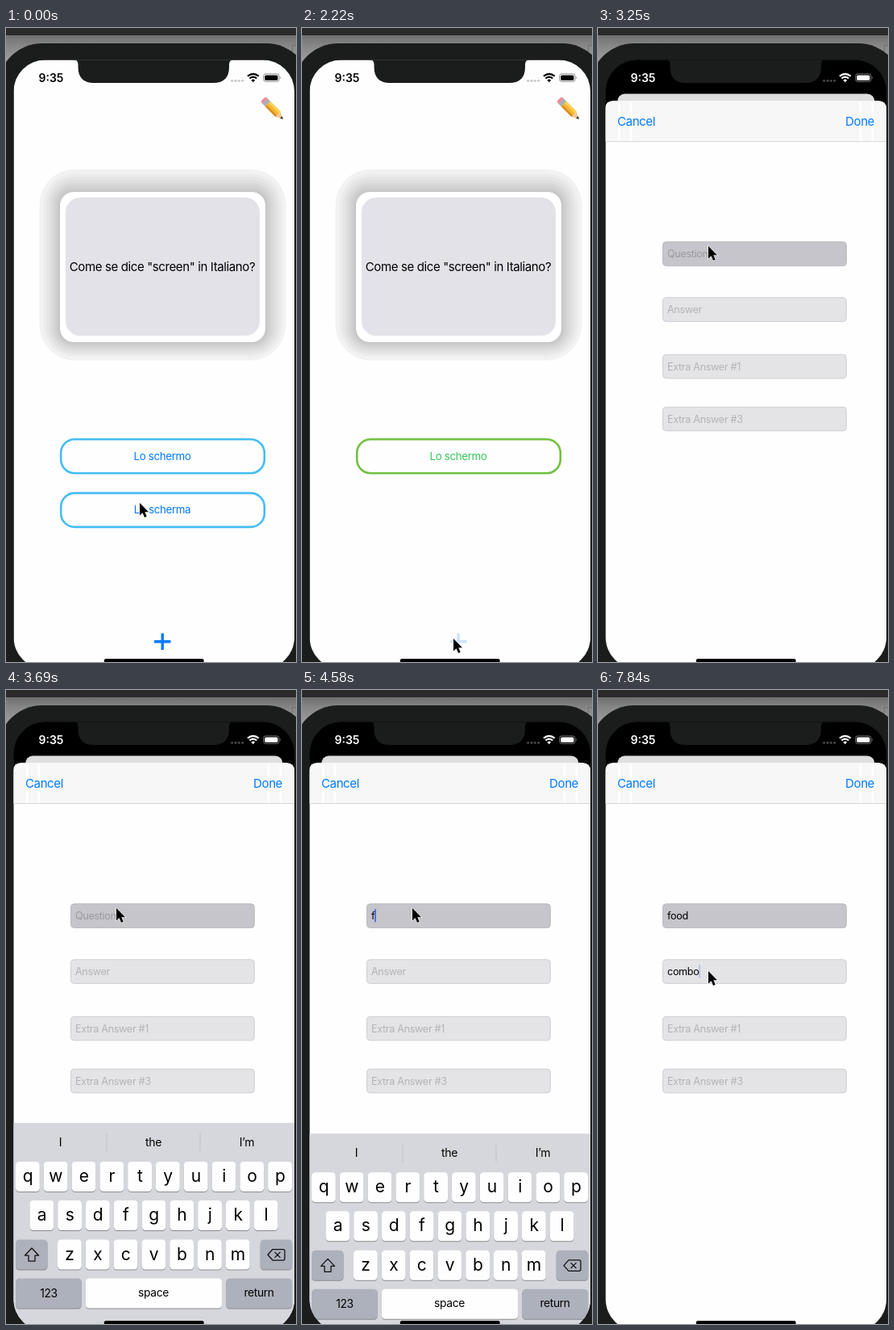
Recreate the animation shown at these times as an HTML page. Size 360x785 px, loop 7.99 s.

```html
<!DOCTYPE html>
<html lang="en">
<head>
<meta charset="utf-8">
<title>Flashcards</title>
<style>
html, body { margin: 0; width: 100%; height: 100%; overflow: hidden; background: #1b1d1d; }
svg { display: block; width: 360px; height: 785px; }
text { font-family: Inter, Roboto, sans-serif; letter-spacing: -.025em; white-space: pre; }
.mid { text-anchor: middle; }
.field { font-size: 12.6px; }
</style>
</head>
<body>
<script>
const LOOP = 7990, STEP = 147.96;
const BLUE = '#007aff';

const rect = (x, y, w, h, r, fill, extra = '') =>
  `<rect x="${x}" y="${y}" width="${w}" height="${h}" rx="${r}" fill="${fill}" ${extra}/>`;
const label = (x, y, size, str, fill = '#000', extra = '') =>
  `<text x="${x}" y="${y}" font-size="${size}" fill="${fill}" ${extra}>${str}</text>`;
const centred = (x, y, size, str, fill) => label(x, y, size, str, fill, 'class="mid"');

// Banded shadow: nested rounded rectangles that darken inwards
function cardShadow() {
  const bands = [25.5, 20.5, 17, 13.5, 10, 7, 4, 1.5];
  return bands.map((d, i) => {
    const c = 242 - i * 6.5;
    return rect(67 - d, 200.5 + 2.5 * i / 7 - d, 255 + 2 * d, 185.5 + 2 * d,
      16 + d * 1.1, `rgb(${c},${c},${c})`);
  }).join('');
}

const pencil = `<g transform="translate(331 100) rotate(45)">
  ${rect(-17, -4.5, 7, 9, 3, '#e8919b')}
  ${rect(-12.5, -4.5, 4, 9, 0, '#9fb0b8')}
  ${rect(-8.5, -4.5, 18, 9, 0, '#f6b530')}
  ${rect(-8.5, -4.5, 18, 3, 0, '#ffd05a')}
  ${rect(-8.5, 2, 18, 2.5, 0, '#d98a1c')}
  <path d="M9.5-4.5L18 0L9.5 4.5Z" fill="#eccb9d"/>
  <path d="M14.7-1.8L18.3 0L14.7 1.8Z" fill="#333"/></g>`;

const answer = (id, y, str) => `<g id="${id}">
  <rect x="68.2" y="${y}" width="252.6" height="42" rx="17" fill="none" stroke="#45bdf3" stroke-width="2.6"/>
  ${centred(194, y + 25.5, 13.3, str, BLUE)}</g>`;

const home = `<g id="home"><g clip-path="url(#homeClip)">
  ${rect(9, 39, 350, 755, 0, '#fefefe')}
  ${cardShadow()}
  ${rect(67, 203, 255, 186, 17, '#fff')}
  ${rect(74, 210, 241, 171, 18, '#e3e2e8')}
  ${centred(194, 301, 15, 'Come se dice "screen" in Italiano?')}
  ${answer('right', 509.2, 'Lo schermo')}
  ${answer('wrong', 575.9, 'Lo scherma')}
  <path id="plus" d="M184 759.7H204.4M194.2 749.5V770" stroke="${BLUE}" stroke-width="3.4"/>
  ${pencil}
  <rect id="dim" x="9" y="39" width="350" height="755"/>
</g></g>`;

const FIELDS = [[174, 'Question'], [243, 'Answer'], [313.5, 'Extra Answer #1'], [378.5, 'Extra Answer #3']];
const field = ([y, hint], i) =>
  rect(80.5, y + .5, 227.8, 29.6, 4, i ? '#e4e4e7' : '#c6c5cb', `stroke="${i ? '#cfcfd4' : '#b9b8be'}"`) +
  label(86, y + 20, 12.6, hint, i ? '#b3b3b8' : '#9b9aa0', `class="field" id="field${i}"`);

const modal = `<g id="modal">
  <path d="M9 720V10Q9 0 19 0H348Q358 0 358 10V720Z" fill="#fefefe"/>
  <path d="M9 50V10Q9 0 19 0H348Q358 0 358 10V50Z" fill="#f7f7f7"/>
  ${[25, 39.5, 324.5, 339.5].map(x => rect(x, 2, 2.8, 48, 1, '#fff')).join('')}
  ${rect(9, 49.8, 350, 1, 0, '#d6d6d6')}
  ${label(24, 31, 15, 'Cancel', BLUE)}
  ${label(343, 31, 15, 'Done', BLUE, 'text-anchor="end"')}
  ${FIELDS.map(field).join('')}
  <rect id="caret" width="1.7" height="16" fill="#3f66e0"/></g>`;

const key = (x, y, w, fill = '#fefefe') =>
  rect(x, y + 1, w, 37, 4.5, '#898b90') + rect(x, y, w, 37, 4.5, fill);
const letterRow = (letters, x0, y) => [...letters].map((c, i) => {
  const x = x0 + i * 34.8;
  return key(x, y, 29.8) + centred(x + 14.9, y + 25, 21, c);
}).join('');

const GREY = '#adb1bb';
const keyboard = `<g id="keyboard">
  ${rect(9, 492, 350, 305, 0, '#d5d7dc')}
  <path d="M125 505V527M241 505V527" stroke="#bfc1c6"/>
  ${centred(67.5, 521, 14, 'I')}${centred(183, 521, 14, 'the')}${centred(299, 521, 14, 'I’m')}
  ${letterRow('qwertyuiop', 12, 540)}
  ${letterRow('asdfghjkl', 29.4, 588)}
  ${letterRow('zxcvbnm', 64, 636.5)}
  ${key(12, 636.5, 39.5, GREY)}${key(315.7, 636.5, 39.5, GREY)}
  ${key(12, 684.5, 81.8, GREY)}${key(98.8, 684.5, 169.4)}${key(273.3, 684.5, 81.8, GREY)}
  ${centred(53, 708, 13.8, '123')}${centred(183, 707, 13.8, 'space')}${centred(314, 707, 13.8, 'return')}
  <g fill="none" stroke="#111" stroke-width="1.3" stroke-linejoin="round">
    <path d="M32 647L40.5 656H36V663H28V656H23.5Z"/>
    <path d="M331 648.5H344Q346 648.5 346 650.5V660Q346 662 344 662H331L325 655.2ZM333.5 651.8L340.5 658.8M340.5 651.8L333.5 658.8"/>
  </g>
  <g fill="none" stroke="#55585d" stroke-width="1.6" stroke-linecap="round">
    <circle cx="46.3" cy="756.7" r="11"/>
    <path d="M39.5 759H53Q52 765 46.3 765T39.5 759Z"/>
    <path d="M42.5 752V754M50 752V754" stroke-width="2.4"/>
    <rect x="316.3" y="743.5" width="7.6" height="15.5" rx="3.8"/>
    <path d="M312.5 754V756Q312.5 763 320 763T327.5 756V754M320 763V768M315.5 768.5H324.5"/>
  </g></g>`;

const statusBar = `
  <g fill="#8e8e93" opacity=".5">${[280.6, 285, 289.3, 293.6].map(x => `<circle cx="${x}" cy="65.3" r="1.5"/>`).join('')}</g>
  <g id="status">
    <text x="40.5" y="66.7" font-size="14" font-weight="600" style="letter-spacing:0">9:35</text>
    <path d="M306.8 67.2L304.4 64.6Q306.8 62.6 309.2 64.6Z"/>
    <g fill="none" stroke="currentColor" stroke-width="2.1">
      <path d="M302.4 62.4Q306.8 58.9 311.2 62.4M299.9 59.6Q306.8 54 313.7 59.6"/>
      <rect x="319.6" y="56.9" width="19.4" height="9.4" rx="2.8" stroke-width="1" opacity=".45"/>
    </g>
    ${rect(321.2, 58.5, 16.2, 6.2, 1.5, 'currentColor')}
    <path d="M340.2 60Q342 61.6 340.2 63.2Z" opacity=".5"/>
  </g>`;

document.body.innerHTML = `<svg viewBox="0 0 360 785">
  <defs>
    <linearGradient id="desk" x2="0" y2="1"><stop stop-color="#5f5f5f"/><stop offset=".35" stop-color="#858585"/><stop offset="1" stop-color="#b5b5b5"/></linearGradient>
    <clipPath id="screen"><rect x="9.5" y="39.5" width="348.5" height="754" rx="39"/></clipPath>
    <clipPath id="homeClip"><rect id="homeShape" x="9.5" y="39.5" width="348.5" height="754"/></clipPath>
  </defs>
  ${rect(0, 0, 360, 60, 0, 'url(#desk)')}
  ${rect(0, 0, 360, 9, 0, '#2a2a2a')}
  <path d="M360 21.5H355.5V38H360" fill="none" stroke="#707070"/>
  ${rect(-10, 19, 388, 840, 55, '#1b1d1d')}
  <g clip-path="url(#screen)">
    ${rect(9, 39, 350, 756, 0, '#000')}
    ${home}
    <path d="M83 39Q89.500 39 89.500 45V48Q89.500 68 109 68H257.500Q277 68 277 48V45Q277 39 284 39Z" fill="#1b1d1d"/>
    ${statusBar}${modal}${keyboard}
    ${rect(121.7, 781, 124, 5, 2.5, '#000')}
  </g>
  <path id="cursor" d="M0 0V15.600L3.600 12.300L6 17.900L8.700 16.700L6.300 11.300H11Z" fill="#000" stroke="#fff" stroke-width="1.1" paint-order="stroke"/>
</svg>`;

const $ = id => document.getElementById(id);
const set = (el, attrs) => { for (const k in attrs) el.setAttribute(k, attrs[k]); };
const mix = (a, b, k) => a + (b - a) * k;

// Critically damped approach from 0 to 1
const spring = (n, start, speed) => {
  const t = Math.max(0, n - start) * speed;
  return 1 - (1 + t) * Math.exp(-t);
};

const PATH = [[0, 166, 588], [4, 186, 527], [6, 186, 527], [8, 174, 574], [12, 188, 756], [15, 188, 756],
  [17, 168, 393], [20, 137, 270], [33, 137, 270], [35, 122, 348], [41, 122, 348], [43, 127, 418],
  [45, 127, 418], [47, 137, 348], [54, 137, 348]];
function cursorAt(n) {
  const i = PATH.findIndex(p => p[0] > n);
  const [a, ax, ay] = PATH[i - 1], [b, bx, by] = PATH[i];
  const u = (n - a) / (b - a), k = u * u * (3 - 2 * u);
  return [mix(ax, bx, k), mix(ay, by, k)];
}

// Latest entry whose step has been reached
const latest = (list, n) => list.filter(e => e[0] <= n).pop()[1];
const TYPED = [
  [[0, ''], [31, 'f'], [32, 'foo'], [33, 'food']],
  [[0, ''], [36, 'c'], [37, 'ci'], [40, 'cib'], [41, 'cibo'], [44, 'combo']]
];
const CARET = [[0, -1], [31, 0], [35, 1], [44, 2], [48, 1]];

function draw(ms) {
  const n = Math.min(53, Math.floor((ms + 16) / STEP));

  const solved = n >= 6;
  const [box, text] = $('right').children;
  set(box, { stroke: solved ? '#72c13f' : '#45bdf3' });
  set(text, { fill: solved ? '#34c759' : BLUE, opacity: n === 5 ? .3 : 1 });
  set($('wrong'), { opacity: solved ? 0 : 1 });
  set($('plus'), { opacity: n >= 15 ? .2 : 1 });

  const p = spring(n, 15.2, 2.56);
  const scale = mix(1, .916, p);
  set($('home'), { transform: `translate(${183.7 * (1 - scale)} ${mix(39.5, 81.5, p) - 39.5 * scale}) scale(${scale})` });
  set($('homeShape'), { rx: p ? 10 : 0 });
  set($('dim'), { opacity: .12 * p });
  const top = mix(790, 90.3, p);
  set($('modal'), { transform: `translate(0 ${top})` });
  const c = Math.round(255 * (p < 1e-6 ? 0 : spring(n, 15.5, 1.9)));
  set($('status'), { fill: `rgb(${c},${c},${c})`, color: `rgb(${c},${c},${c})` });

  TYPED.forEach((list, i) => {
    const typed = latest(list, n), el = $('field' + i);
    el.textContent = typed || FIELDS[i][1];
    set(el, { fill: typed ? '#000' : i ? '#b3b3b8' : '#9b9aa0' });
  });
  const active = latest(CARET, n);
  if (active >= 0) {
    const width = active < 2 && latest(TYPED[active], n) ? $('field' + active).getComputedTextLength() : 0;
    set($('caret'), { x: 86 + width - .2, y: FIELDS[active][0] + 7 });
  }
  set($('caret'), { opacity: active < 0 ? 0 : n === 53 ? .3 : 1 });

  const shown = spring(n, 23.3, 2) - spring(n, 30.6, 2);
  set($('keyboard'), { transform: `translate(0 ${300 * (1 - shown)})`, visibility: shown > .01 ? 'visible' : 'hidden' });

  set($('cursor'), { transform: `translate(${cursorAt(n)})` });
}

const begin = performance.now();
function tick() {
  draw((performance.now() - begin) % LOOP);
  requestAnimationFrame(tick);
}
tick();
</script>
</body>
</html>
```
